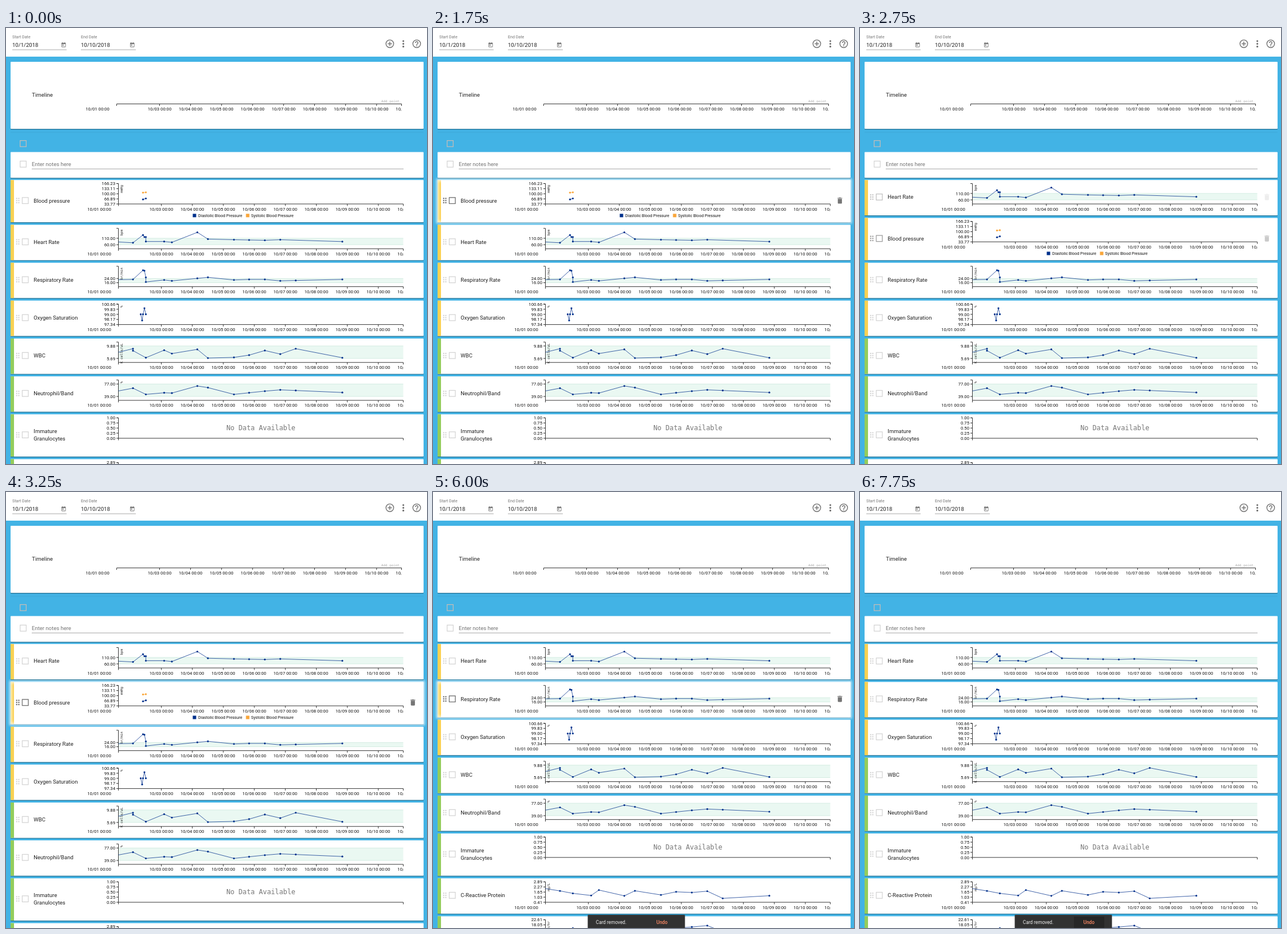
Recreate the animation shown at these times as an HTML page. Size 736 by 761 pixels, loop 8 s.

```html
<!DOCTYPE html>
<html lang="en">
<head>
<meta charset="utf-8">
<title>Patient chart cards</title>
<style>
  html, body { margin: 0; width: 100%; height: 100%; overflow: hidden; background: #42b3e5; }
  svg { display: block; width: 736px; height: 761px; font-family: Roboto, sans-serif; }
  .mono { font-family: "DejaVu Sans Mono", monospace; }
</style>
</head>
<body>
<svg id="stage" viewBox="0 0 736 761" xmlns="http://www.w3.org/2000/svg"></svg>
<script>
const LOOP = 8000, STEP = 250, FADE = 400;
const NAVY = '#03318c', ORANGE = '#f9a63a', YELLOW = '#fbd153', GREEN = '#94cd5c';
const FIRST_TOP = 265.3, GAP = 4.45, SHORT = 61.7, TALL = 73.75;
const DAY = 54.2, AXIS_Y = 41.8;

const ICON = {
  trash: 'M6 19c0 1.1.9 2 2 2h8c1.1 0 2-.9 2-2V7H6v12zM19 4h-3.5l-1-1h-5l-1 1H5v2h14V4z',
  day: 'M19 3h-1V1h-2v2H8V1H6v2H5c-1.1 0-2 .9-2 2v14c0 1.1.9 2 2 2h14c1.1 0 2-.9 2-2V5c0-1.1-.9-2-2-2zm0 16H5V8h14v11zM7 10h5v5H7z',
  plus: 'M13 7h-2v4H7v2h4v4h2v-4h4v-2h-4V7z',
  help: 'M11 18h2v-2h-2v2zm1-12c-2.21 0-4 1.79-4 4h2c0-1.1.9-2 2-2s2 .9 2 2c0 2-3 1.75-3 5h2c0-2.25 3-2.5 3-5 0-2.21-1.79-4-4-4z'
};

// Sample times shared by all charts; a nested list holds several values at one time.
const X = [196.5, 222, 239.5, 242, 244.5, 276.5, 290, 334.5, 353, 398.5, 425, 452.5, 479.5, 506.5, 588];
const ROWS = {
  bp: { name: ['Blood pressure'], color: YELLOW, tall: true, unit: 'mmHg',
    scale: ['166.23', '133.11', '100.00', '66.89', '33.77'],
    data: [, , 33.9, , 32.2], second: [, , 22, , 21.5] },
  hr: { name: ['Heart Rate'], color: YELLOW, unit: 'bpm', band: [23.5, 34.7, '110.00', '60.00'],
    data: [30, 31.3, 17.8, 21.3, [21.3, 29.2], 29.2, 30.6, 13.2, 24.9, 26, 26.5, 27, 26, , 29.3] },
  rr: { name: ['Respiratory Rate'], color: YELLOW, unit: 'br/min', band: [27.6, 34.9, '24.00', '16.00'],
    data: [29.6, 29.2, 13.2, 14, [25.6, 33.6], 30.1, 31.7, 27.3, 25.5, 30.1, 29.2, 29.2, 31.7, 31, 29.2] },
  ox: { name: ['Oxygen Saturation'], color: YELLOW, unit: '%',
    scale: ['100.66', '99.83', '99.00', '98.17', '97.34'],
    points: [[235.5, 23.9], [238, 34.7], [239.5, 23.9], [242, 13.2], [244.5, 23.9]] },
  wbc: { name: ['WBC'], color: GREEN, unit: 'K cells/uL', band: [13, 34.8, '9.88', '5.69'],
    data: [24, [17.8, 21.2], , , 33.5, 20.4, 26.3, 19, 34.1, 33, 29, 21, 27.2, 17.8, 33.6] },
  neut: { name: ['Neutrophil/Band'], color: GREEN, unit: '%', band: [13.3, 35, '77.00', '39.00'],
    data: [25.4, 20.6, , , 31.4, 28.6, 29.1, 16.7, 19.6, 31.4, 28.6, 25.7, 23.5, 24.6, 28.1] },
  ig: { name: ['Immature', 'Granulocytes'], color: GREEN, tall: true,
    scale: ['1.00', '0.75', '0.50', '0.25', '0.00'] },
  crp: { name: ['C-Reactive Protein'], color: GREEN, unit: 'mg/L',
    scale: ['2.89', '2.27', '1.65', '1.03', '0.41'],
    data: [18, 22, , , 26.3, 30, 20.5, 30.6, 21.8, 29, 23.6, 24.8, 22.5, 35, 30.4] },
  esr: { name: ['ESR'], color: GREEN, unit: 'mm/hr',
    scale: ['22.61', '18.05', '13.49', '8.93', '4.37'],
    data: [24, 26, , , 21, 25, 27, 23, 25, 24, 21, 18.8, 16.4, 27, 29] }
};

// Pointer visits: card, time in, time out.
const VISITS = [
  ['neut', 500, 650], ['wbc', 600, 750], ['ox', 700, 850], ['rr', 775, 950], ['hr', 850, 1100],
  ['bp', 1000, 1750], ['hr', 1850, 2400], ['bp', 2600, 9000],
  ['rr', 5600, 6200], ['ox', 6150, 6300], ['wbc', 6250, 6400], ['neut', 6330, 6480],
  ['ig', 6400, 6630], ['crp', 6525, 7050]
];

const clamp = v => Math.max(0, Math.min(1, v));
const rect = (x, y, w, h, fill, more = '') =>
  `<rect x="${x}" y="${y}" width="${w}" height="${h}" fill="${fill}" ${more}/>`;
const path = (d, color, width = 1) => `<path d="${d}" fill="none" stroke="${color}" stroke-width="${width}"/>`;
const icon = (name, cx, cy, scale, fill = '#757575') =>
  `<path d="${ICON[name]}" fill="${fill}" transform="translate(${cx - 12 * scale} ${cy - 12 * scale}) scale(${scale})"/>`;
// y is the middle of the capitals
const text = (x, y, s, size, fill = '#212121', more = '') =>
  `<text x="${x}" y="${y + size * 0.36}" font-size="${size}" fill="${fill}" ${more}>${s}</text>`;
const MID = 'text-anchor="middle"', END = 'text-anchor="end"';
const box = (cx, cy, color) => rect(cx - 5.3, cy - 5.3, 10.6, 10.6, 'none', `stroke="${color}" stroke-width="1.2"`);
const card = (y, h) => rect(8, y + 1.4, 722, h, '#000', 'opacity=".3" rx="1"') + rect(8, y, 722, h, '#fff', 'rx="1"');

function handle(cy, color) {
  let s = '';
  for (let i = 0; i < 6; i++) s += rect(17.7 + (i % 2) * 3.7, cy - 4.7 + (i >> 1) * 3.7, 2, 2, color);
  return s;
}

function dateAxis(x0, y, ticks = true) {
  const x1 = x0 + 498, first = x0 + 75;
  let d = `M${x0} ${y + 3.5}V${y}H${x1}V${y + 3.5}`, labels = '';
  if (ticks) {
    labels = text(x0 - 33.5, y + 8.8, '10/01 00:00', 7.7, '#111', MID);
    for (let i = 0; i < 9; i++) {
      const x = first + i * DAY;
      if (x < x1) d += `M${x} ${y}v3.5`;
      labels += text(x, y + 8.8, `10/${String(i + 3).padStart(2, '0')} 00:00`, 7.7, '#111', MID);
    }
  }
  return path(d, '#222', 0.9) + `<g clip-path="url(#chart${x0 > 195 ? 1 : 0})">${labels}</g>`;
}

function toPoints(data) {
  const out = [];
  data.forEach((v, i) => [].concat(v).forEach(y => out.push([X[i], y])));
  return out;
}

function series(points, color) {
  const dots = points.filter(p => p[0] > 197)
    .map(([x, y]) => `<circle cx="${x}" cy="${y}" r="1.6" fill="${color}"/>`).join('');
  return path('M' + points.map(p => p.join(' ')).join('L'), color, 0.75) + dots;
}

function chart(r) {
  let s = '', d = `M193 6.2H196.5V${AXIS_Y}`;
  const marks = r.scale ? r.scale.map((v, i) => [6.2 + i * 8.9, v]) : [];
  if (r.band) {
    const [a, b, hi, lo] = r.band;
    s += rect(197, a, 497.5, b - a, '#eaf8f2') + path(`M197 ${a}H694.5M197 ${b}H694.5`, '#c6e6d8', 0.7);
    marks.push([a, hi], [b, lo]);
  }
  for (const [y, v] of marks) {
    d += `M193 ${y}h3.5`;
    s += text(191, y, v, 7.7, '#111', END);
  }
  s += path(d, '#222', 0.9) + dateAxis(196.5, AXIS_Y, !!r.unit);
  if (!r.unit) return s + text(445.5, 23.5, 'No Data Available', 11.8, '#777', `${MID} class="mono"`);
  s += `<text transform="translate(204 8.6) rotate(-90)" font-size="5.8" fill="#222" class="mono" ${END}>${r.unit}</text>`;
  s += series(r.points || toPoints(r.data), NAVY);
  if (r.second) {
    s += series(toPoints(r.second), ORANGE)
      + rect(326.5, 59, 6, 6, NAVY) + text(336, 62, 'Diastolic Blood Pressure', 7.1, '#111')
      + rect(419.5, 59, 6, 6, ORANGE) + text(428.5, 62, 'Systolic Blood Pressure', 7.1, '#111');
  }
  return s;
}

function row(r) {
  const h = r.tall ? TALL : SHORT, cy = r.tall ? 35.9 : 29.7;
  const names = r.name.map((n, i) => text(48.3, cy + (i - (r.name.length - 1) / 2) * 12.4, n, 9.5)).join('');
  return card(0, h) + rect(8, 0, 6, h, r.color) + handle(cy, '#cfcfcf') + box(33.7, cy, '#d2d2d2') + names + chart(r)
    + `<g class="hot">${handle(cy, '#666')}${box(33.7, cy, '#707070')}</g>`
    + `<g class="bin">${icon('trash', 711.3, cy, 0.6)}</g>`
    + rect(8, 0, 722, h, 'none', 'class="glow" stroke="#fff" stroke-width="3.6" filter="url(#soft)"');
}

function dateField(x, label, value, w) {
  return text(x, 15.7, label, 7.1, '#757575') + text(x, 29.3, value, 9.55)
    + icon('day', x + 89.7, 29.6, 0.42) + path(`M${x} 38H${x + w}`, '#949494', 0.8);
}

function header() {
  const ring = x => `<circle cx="${x}" cy="27.6" r="6.7" fill="none" stroke="#707070" stroke-width="1.4"/>`;
  const dots = [22.8, 27.6, 32.4].map(y => `<circle cx="694.6" cy="${y}" r="1.6" fill="#707070"/>`).join('');
  return rect(0, 0, 736, 50, '#fff')
    + dateField(11, 'Start Date', '10/1/2018', 95) + dateField(131, 'End Date', '10/10/2018', 96)
    + ring(671) + icon('plus', 671, 27.6, 0.75) + dots + ring(718) + icon('help', 718, 27.6, 0.75);
}

function panels() {
  return card(59, 117) + text(45.3, 117, 'Timeline', 9.6)
    + text(656, 128, 'Add point', 5.9, '#aaa', 'class="mono"') + dateAxis(193.5, 132.5)
    + path('M8 182H730', 'rgba(0,0,0,.08)', 0.8) + box(30, 201.8, '#c9bdb5')
    + card(216.5, 45) + box(30, 237.6, '#d2d2d2')
    + text(45, 237.5, 'Enter notes here', 9.5, '#757575') + path('M45 246H695', '#8e8e8e', 0.8);
}

const stage = document.getElementById('stage');
stage.innerHTML = `<defs>
    <clipPath id="chart0"><rect width="691" height="800"/></clipPath>
    <clipPath id="chart1"><rect width="694.6" height="800"/></clipPath>
    <filter id="soft" filterUnits="userSpaceOnUse" x="-4" y="-12" width="750" height="100"><feGaussianBlur stdDeviation="2"/></filter>
  </defs>`
  + rect(0, 0, 736, 761, '#42b3e5') + header() + panels()
  + Object.keys(ROWS).map(id => `<g id="${id}">${row(ROWS[id])}</g>`).join('')
  + `<g id="drag" opacity=".86">${row(ROWS.bp)}</g>`
  + '<circle id="tap" cx="708.8" cy="369.6" r="11.8" fill="#87178d" opacity=".95"/>'
  + `<g id="snack">${rect(270.5, 738, 170, 28.5, '#323232', 'rx="1"')}`
  + rect(374, 741, 53, 22, '#272727', 'id="undo"')
  + text(284.8, 751.3, 'Card removed.', 8.25, '#f0f0f0')
  + text(400.3, 751.3, 'Undo', 8.3, '#ff8a65', `${MID} font-weight="500"`) + '</g>';

const $ = id => document.getElementById(id);
const show = (el, on) => el.setAttribute('display', on ? 'inline' : 'none');
const fade = (el, v) => el.setAttribute('opacity', v);

function hover(id, t) {
  return Math.max(0, ...VISITS.filter(v => v[0] === id && t >= v[1]).map(([, a, b]) =>
    t < b ? clamp((t - a) / FADE) : clamp((b - a) / FADE) - (t - b) / FADE));
}

function setHover(g, v) {
  fade(g.querySelector('.hot'), clamp(v * 1.4));
  fade(g.querySelector('.bin'), v);
  fade(g.querySelector('.glow'), clamp((v - 0.6) / 0.4) * 0.9);
}

function draw(time) {
  const t = Math.floor(time / STEP) * STEP;
  const dragging = t >= 2000 && t < 2750, removed = t >= 5750;
  let order = Object.keys(ROWS);
  if (t >= 2500) order = ['hr', 'bp', ...order.slice(2)];
  if (removed) order = order.filter(id => id !== 'bp');

  let y = FIRST_TOP;
  for (const id of order) {
    const g = $(id);
    g.setAttribute('transform', `translate(0 ${y})`);
    setHover(g, hover(id, t));
    y += (ROWS[id].tall ? TALL : SHORT) + GAP;
  }
  show($('bp'), !removed);
  fade($('bp'), dragging ? 0.2 : 1);

  show($('drag'), dragging);
  const dy = Math.min(70, 8 + 37 * (t - 2000) / STEP);
  $('drag').setAttribute('transform', `translate(-1.2 ${FIRST_TOP + dy})`);

  show($('tap'), t === 5500);
  show($('snack'), removed);
  const rise = 1 - clamp((t - 5650) / 300);
  $('snack').setAttribute('transform', `translate(0 ${28 * rise * rise})`);
  fade($('undo'), clamp((t - 7000) / 500));
}

setHover($('drag'), 0);
draw(0);
const start = performance.now();
requestAnimationFrame(function tick() {
  draw((performance.now() - start) % LOOP);
  requestAnimationFrame(tick);
});
</script>
</body>
</html>
```
